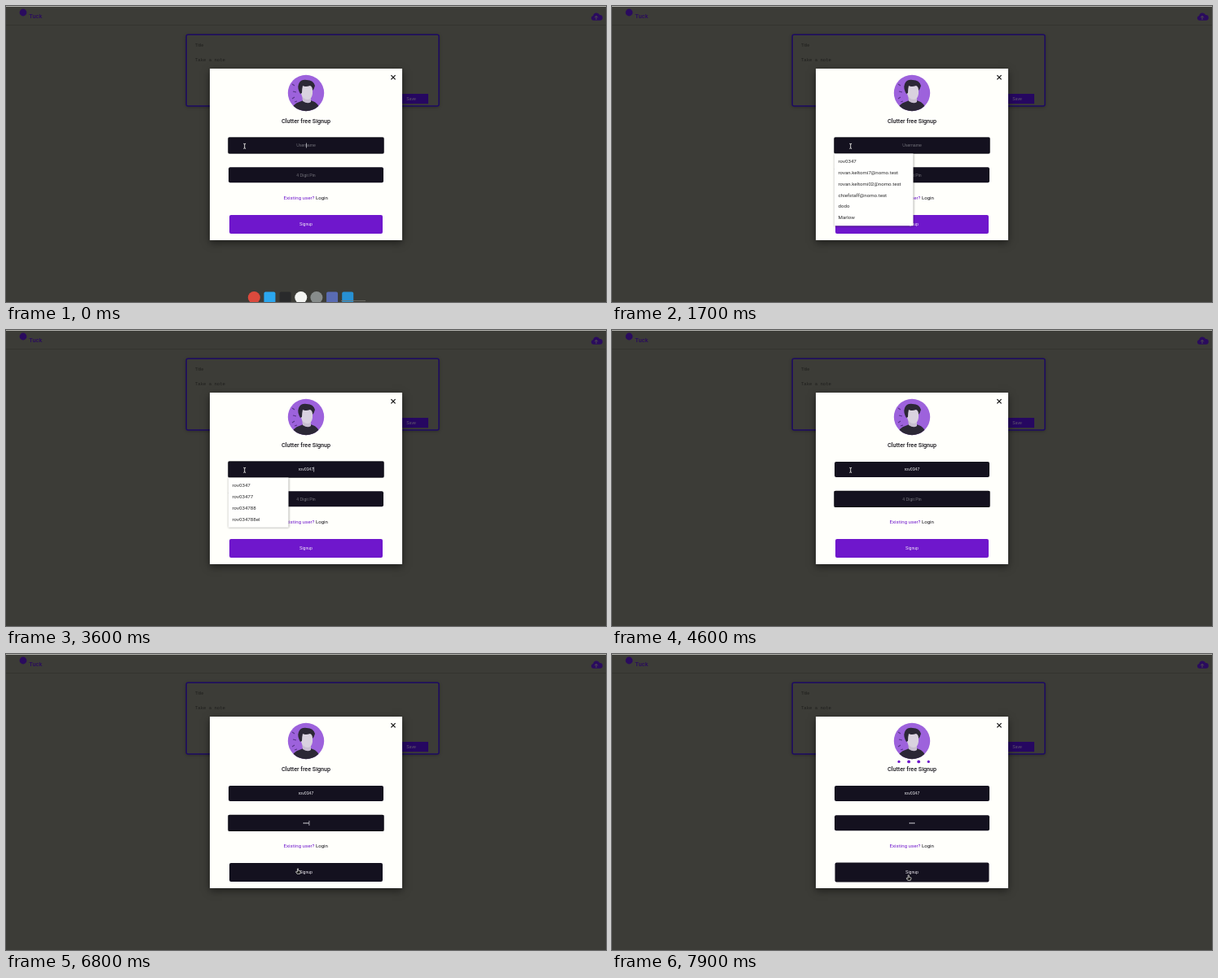
Animation, 736 px wide and 364 px high, one loop 8000 ms. Source, as an HTML page with a canvas:

```html
<!DOCTYPE html>
<html lang="en">
<head>
<meta charset="utf-8">
<title>Signup form</title>
<style>
  html, body { margin: 0; width: 100%; height: 100%; overflow: hidden; background: #3c3c37; }
  canvas { display: block; width: 736px; height: 364px; }
</style>
</head>
<body>
<canvas id="stage"></canvas>
<script>
const W = 736, H = 364, LOOP = 8000, STEP = 100;
const INK = '#14111f', PURPLE = '#6f17cc', DIM = '#2a0b5e', PAPER = '#fffffb';
const ROBOTO = 'Roboto, sans-serif';
const ARIAL = '"Liberation Sans", Arial, sans-serif';
const MONO = '"Liberation Mono", monospace';

const canvas = document.getElementById('stage');
const ctx = canvas.getContext('2d');
const ratio = window.devicePixelRatio || 1;
canvas.width = W * ratio;
canvas.height = H * ratio;

const USERNAME = 'rov0347';
const MATCHES = [USERNAME, USERNAME + '7', 'rov034788', 'rov034788el'];
const MAILS = ['rovan.keltomi7@nomo.test', 'rovan.keltomi02@nomo.test'];
const ALL_HINTS = [USERNAME, ...MAILS, 'chiefstaff@nomo.test', 'dodo', 'Marlow'];
const FIRST_LETTER_HINTS = [USERNAME, ...MAILS, ...MATCHES.slice(1)];

const KEY_TIMES = [1800, 2500, 2600, 2800, 3000, 3200, 3400];
const PIN_TIMES = [5100, 5300, 5600, 5800];
const HINTS_OPEN = 800, TAB_KEY = 4100, MOVE_START = 6200, MOVE_TIME = 700, CLICK = 7200;

const FIELD_X = 273, FIELD_W = 190, FIELD_H = 19, NAME_Y = 162, PIN_Y = 198.3;
const BUTTON = { x: 274, y: 257, w: 188, h: 23 };
const countUntil = (times, t) => times.filter(time => time <= t).length;

function box(x, y, w, h, color, radius = 0) {
  ctx.fillStyle = color;
  ctx.beginPath();
  ctx.roundRect(x, y, w, h, radius);
  ctx.fill();
}

function disc(x, y, r, color) {
  ctx.fillStyle = color;
  ctx.beginPath();
  ctx.arc(x, y, r, 0, Math.PI * 2);
  ctx.fill();
}

function shape(path, fill, stroke, lineWidth = 1) {
  const p = new Path2D(path);
  if (fill) { ctx.fillStyle = fill; ctx.fill(p); }
  if (stroke) { ctx.strokeStyle = stroke; ctx.lineWidth = lineWidth; ctx.stroke(p); }
}

function text(string, x, y, size, color, family = ROBOTO, align = 'left', weight = 400) {
  ctx.font = `${weight} ${size}px ${family}`;
  ctx.textAlign = align;
  ctx.fillStyle = color;
  ctx.fillText(string, x, y);
  return ctx.measureText(string).width;
}

function withShadow(color, blur, offsetY, draw) {
  ctx.save();
  ctx.shadowColor = color;
  ctx.shadowBlur = blur * ratio;
  ctx.shadowOffsetY = offsetY * ratio;
  draw();
  ctx.restore();
}

function drawPage() {
  box(0, 0, W, H, '#3c3c37');
  box(0, 0, W, 1, '#b4b4af');
  box(0, 23, W, 0.8, '#30302d');
  disc(21, 8, 4.4, DIM);
  text('Tuck', 28.2, 14.8, 7.4, DIM, ROBOTO, 'left', 500);

  shape('M720.5 17.8 a3 3 0 0 1 -.3 -5.9 a4.2 4.2 0 0 1 8 -.9 a3.4 3.4 0 0 1 .3 6.8 Z', DIM);
  shape('M724 16.8 V12.6 M722.2 14.2 L724 12.3 L725.8 14.2', null, '#55534f', 0.9);

  withShadow('rgba(0,0,0,.35)', 4, 1, () => box(221, 35, 310, 88, '#3c3c37', 2));
  ctx.strokeStyle = '#1d0a63';
  ctx.lineWidth = 1.5;
  ctx.beginPath();
  ctx.roundRect(221.2, 35.2, 309.8, 87.8, 2);
  ctx.stroke();
  text('Title', 232, 50, 5.5, '#1f1f1d', ARIAL);
  text('Take a note', 232, 68, 5.6, '#1f1f1d', MONO);
  box(476, 108, 42, 12.2, '#260761', 0.5);
  text('Save', 497, 116, 5.1, '#625b6b', ARIAL, 'center');
}

function drawDock(t) {
  if (t >= 200) return;
  const drop = t / 100 * 8;
  const colors = ['#db4a3d', '#2ba7ef', '#292a2b', '#f4f5f2', '#878c8b', '#596bb3', '#2790d3'];
  colors.forEach((color, i) => {
    const x = 304.3 + i * 19.15, y = 358.5 + drop;
    if ([0, 3, 4].includes(i)) disc(x, y, 7.5, color);
    else box(x - 7, y - 7, 14, 14, color, 2);
  });
  box(411, 362 + drop, 30, 0.8, '#777770');
}

function drawAvatar() {
  ctx.save();
  ctx.beginPath();
  ctx.arc(368, 107, 22.2, 0, Math.PI * 2);
  ctx.clip();
  box(345, 84, 46, 46, '#9d62dc');
  shape('M351 96 l3 2 M352 105 l4 1 M351 114 l3 -2 M357 117 l-3 1', null, '#59358a', 1.1);
  shape('M350 130 Q351 120 361 117.5 L367 115 L375 116.5 Q384 119 386 130 Z', '#2c2836');
  shape('M363 109 L374 109 L374 118 Q370 121 364 117 Z', '#c8bfd0');
  shape('M362 99 Q369 95 376 99 V108 Q375 115 370 115 Q364 115 362 108 Z', '#d9d2df');
  shape('M361 108 Q357 101 359 96 Q361 90 369 91 Q377 91 379 98 Q378 102 376 104 Q376 99 373 98 Q367 100 364 98 Q363 102 363 107 Z', '#2c2836');
  ctx.restore();
}

function drawField(y, focused) {
  const grow = focused ? 0.6 : 0;
  box(FIELD_X - grow, y - grow, FIELD_W + 2 * grow, FIELD_H + 2 * grow, INK, 2);
  if (!focused) return;
  ctx.strokeStyle = '#0b0a12';
  ctx.lineWidth = 0.7;
  ctx.strokeRect(FIELD_X, y, FIELD_W, FIELD_H);
}

const caret = (x, centerY) => box(x, centerY - 3, 0.7, 6, '#dedee5');

function nameCaretOn(t) {
  if (t < KEY_TIMES[0]) return t < 400 || (t >= 800 && t < 1200);
  return t < 4000;
}

function pinCaretOn(t) {
  if (t < PIN_TIMES[0]) return t < 4600;
  return t < 6400 || t >= 6800;
}

function drawNameField(t) {
  const focused = t < TAB_KEY;
  const typed = USERNAME.slice(0, countUntil(KEY_TIMES, t));
  drawField(NAME_Y, focused);
  const width = typed
    ? text(typed, 368, 173.2, 5.2, '#eeeef2', ARIAL, 'center')
    : (text('Username', 368, 173.2, 5.11, '#74737c', ARIAL, 'center'), 0);
  if (focused && nameCaretOn(t)) caret(368 + width / 2, 171.5);
}

function drawPinField(t) {
  const focused = t >= TAB_KEY && t < CLICK;
  const digits = countUntil(PIN_TIMES, t);
  drawField(PIN_Y, focused);
  if (!digits) text('4 Digit Pin', 368, 209.9, 5.11, '#74737c', ARIAL, 'center');
  for (let i = 0; i < digits; i++) disc(368 + (i - (digits - 1) / 2) * 1.8, 208, 0.75, '#eeeef2');
  if (focused && pinCaretOn(t)) caret(368 + digits * 0.9, 208);
}

function drawHints(t) {
  if (t < HINTS_OPEN || t >= TAB_KEY) return;
  const filtered = t >= KEY_TIMES[3];
  const hints = filtered ? MATCHES : t >= KEY_TIMES[0] ? FIRST_LETTER_HINTS : ALL_HINTS;
  withShadow('rgba(0,0,0,.4)', 2.5, 0.7, () =>
    box(272.7, 181.5, filtered ? 73.8 : 96.8, 6 + hints.length * 13.8, '#fffffd'));
  hints.forEach((hint, i) => text(hint, 277.6, 193.2 + i * 13.8, 6.13, '#2b2b2d'));
}

function drawButton(t, hovered) {
  const grow = t >= CLICK ? 0.5 : 0;
  box(BUTTON.x - grow, BUTTON.y - grow, BUTTON.w + 2 * grow, BUTTON.h + 2 * grow,
    hovered ? INK : PURPLE, 2);
  text('Signup', 368, 270.3, 5.11, '#f3f0f7', ARIAL, 'center');
}

function drawLoader(t) {
  if (t < CLICK) return;
  for (let i = 0; i < 4; i++) {
    const wave = Math.cos((t - 7900) / 1000 * Math.PI * 2 - (i - 1.5) * 0.9);
    disc(352 + i * 12.1, 132.4, 1.55 + 0.4 * wave, PURPLE);
  }
}

function pointer(t) {
  const u = Math.min(1, Math.max(0, (t - MOVE_START) / MOVE_TIME));
  const p = 1 - Math.pow(1 - u, 1.3);
  return { x: 292.7 + 71 * p, y: 172.3 + 99.5 * p };
}

function drawPointer({ x, y }, hovered) {
  const inField = [NAME_Y, PIN_Y].some(top => y >= top && y <= top + FIELD_H);
  ctx.save();
  ctx.translate(x, y);
  if (hovered) {
    shape('M-.6 .2 Q0 -.6 .6 .2 V2.6 L3 3.1 Q3.5 3.4 3.2 4.4 L2.5 6.5 H-.9 L-2.6 4 Q-2.4 3.1 -.6 4.2 Z',
      '#111', '#f4f4f0', 0.7);
  } else if (inField) {
    shape('M-1.4 -3 Q0 -3 0 -2.3 Q0 -3 1.4 -3 M0 -2.5 V2.5 M-1.4 3 Q0 3 0 2.3 Q0 3 1.4 3',
      null, '#f1f1ed', 0.9);
  } else {
    shape('M0 0 V6 L1.4 4.8 L2.4 7 L3.4 6.5 L2.5 4.4 H4.2 Z', '#111', '#fff', 0.4);
  }
  ctx.restore();
}

function drawModal(t) {
  withShadow('rgba(0,0,0,.5)', 9, 3, () => box(250, 77, 236, 211, PAPER));
  shape('M472.4 85.2 L477.6 90.4 M477.6 85.2 L472.4 90.4', null, '#111', 1.2);
  drawAvatar();
  drawLoader(t);
  text('Clutter free Signup', 368, 144.3, 7.18, '#17151c', ROBOTO, 'center', 500);
  drawNameField(t);
  drawPinField(t);
  const labelWidth = text('Existing user? ', 340.6, 238.2, 6.13, PURPLE);
  text('Login', 340.6 + labelWidth, 238.2, 6.13, '#17151c');

  const mouse = pointer(t);
  const hovered = mouse.y >= BUTTON.y;
  drawButton(t, hovered);
  drawHints(t);
  drawPointer(mouse, hovered);
}

function render(now) {
  const t = Math.floor((now % LOOP) / STEP) * STEP;
  ctx.setTransform(ratio, 0, 0, ratio, 0, 0);
  drawPage();
  drawDock(t);
  drawModal(t);
}

const start = performance.now();
function tick() {
  render(performance.now() - start);
  requestAnimationFrame(tick);
}
tick();
</script>
</body>
</html>
```
